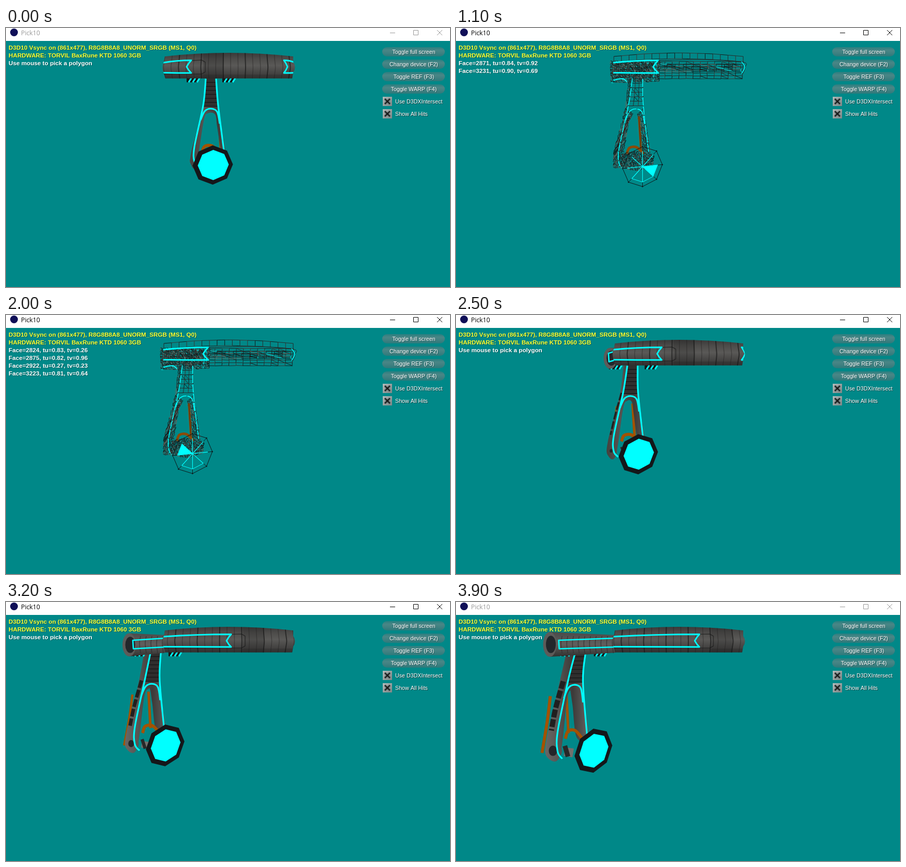
An HTML page with a canvas for the animation above (4 s loop, 858 px wide and 501 px high).

```html
<!DOCTYPE html>
<html lang="en">
<head>
<meta charset="utf-8">
<title>Pick10</title>
<style>
html, body { margin: 0; width: 100%; height: 100%; overflow: hidden; background: #008888; }
canvas { display: block; }
</style>
</head>
<body>
<canvas id="stage" width="858" height="501"></canvas>
<script>
const c = document.getElementById('stage').getContext('2d');
const CYAN = '#00ffff', BROWN = '#a35200', LOOP = 4000, STEP = 100;
const PICK_ON = 600, PICK_MOVE = 1100, PICK_OFF = 2400;
const SANS = '"Liberation Sans", Arial, sans-serif';

let k = 0, e = 0, seed = 1;   // turn of the model, its eased drop, random state
const rnd = () => (seed = seed * 16807 % 2147483647) / 2147483647;
const mix = (a, b, f) => a + (b - a) * f;
const mid = (p, q, f) => [mix(p[0], q[0], f), mix(p[1], q[1], f)];

// turning slides a point left, more so lower down and deeper in; low points also drop
function place(depth, x, y) {
  const low = (y - 98) / 165;
  return [x - k * (155 + 12 * Math.min(1, low * 2.4) + 15 * depth), y + e * 33 * low * Math.abs(low)];
}
const edge = (depth, ...pts) => pts.map(p => place(depth, ...p));

function trace(pts, smooth, closed) {
  c.beginPath();
  c.moveTo(...pts[0]);
  for (let i = 1; i < pts.length; i++) {
    const p = pts[i - 1], q = pts[i];
    if (!smooth) { c.lineTo(...q); continue; }
    const o = pts[i - 2] || p, r = pts[i + 1] || q;
    c.bezierCurveTo(p[0] + (q[0] - o[0]) / 6, p[1] + (q[1] - o[1]) / 6,
      q[0] - (r[0] - p[0]) / 6, q[1] - (r[1] - p[1]) / 6, ...q);
  }
  if (closed) c.closePath();
}
function line(pts, color, width, smooth = true, closed = false) {
  trace(pts, smooth, closed);
  c.strokeStyle = color;
  c.lineWidth = width;
  c.stroke();
}
function area(pts, color, smooth = false) {
  trace(pts, smooth, true);
  c.fillStyle = color;
  c.fill();
}
function oval(x, y, rx, ry, color) {
  c.beginPath();
  c.ellipse(x, y, rx, ry, 0, 0, 7);
  c.fillStyle = color;
  c.fill();
}
function shade(x0, y0, x1, y1, ...colors) {
  const g = c.createLinearGradient(x0, y0, x1, y1);
  colors.forEach((v, i) => g.addColorStop(i / (colors.length - 1), v));
  return g;
}
function text(s, x, y, font, color, shadow) {
  c.font = font;
  if (shadow) {
    c.fillStyle = shadow;
    c.fillText(s, x + 1, y + 1);
  }
  c.fillStyle = color;
  c.fillText(s, x, y);
}

function armParts() {
  return {
    outer: edge(1, [384, 98], [380, 155], [358, 240], [358, 265]),
    inner: edge(0, [368, 265], [382, 180], [390, 165]),
    rearIn: edge(1, [404, 167], [408, 190], [416, 238]),
    rearOut: edge(0, [424, 238], [410, 155], [408, 98]),
    trims: [
      edge(0, [386, 98], [381, 150], [364, 230], [364, 258], [373, 268]),
      edge(0, [406, 98], [410, 150], [421, 236]),
      edge(0, [376, 178], [384, 161], [396, 156], [408, 162], [413, 185])
    ],
    cable: edge(2, [380, 175], [374, 215], [364, 260]),
    rod: edge(2, [411, 170], [415, 232]),
    hose: edge(0, [379, 240], [384, 229], [398, 228], [412, 240])
  };
}

function arm() {
  const a = armParts();
  line(a.cable, BROWN, 1 + 5 * k);
  line(a.rod, BROWN, 5);
  oval(...place(.3, 362, 257), 7 + 8 * k, 8 + 7 * k, '#555351');
  const left = mix(357, 174, k), side = k > .4 ? '#686664' : '#45423f';
  area([...a.outer, ...a.inner, ...a.rearIn, ...a.rearOut],
    shade(left, 0, left + 78, 0, side, '#555351', '#3c3a39', '#5f5d5b'), true);

  const neck = edge(0, [386, 97], [405, 97], [409, 152], [382, 152]);
  area(neck, '#302f2e');
  for (let f = .15; f < 1; f += .14)
    line([mid(neck[0], neck[3], f), mid(neck[1], neck[2], f)], '#191919', 1.5);

  if (k > .25) {
    c.setLineDash([15, 4]);
    line(edge(.6, [381, 150], [369, 195], [361, 228]), '#201f1f', 10 * k);
    c.setLineDash([]);
    oval(...place(.4, 361, 257), 8 * k, 10 * k, '#24262a');
  }
  a.trims.forEach(p => line(p, CYAN, 3.2));
  line(edge(0, [377, 258], [394, 260]), '#72706d', 4 + 13 * k);
  line(edge(0, [378, 250], [384, 265]), '#282828', 9 * k + .1);
  line(a.hose, BROWN, 6);
}

function lensShape() {
  const hub = [399.5 - 133.5 * k, 265 + 22.5 * e];
  const rim = Array.from({ length: 8 }, (_, i) => {
    const a = (i - 2) * Math.PI / 4, x = (39 - 2.5 * k) * Math.cos(a);
    return [hub[0] + x, hub[1] + (38 + 4.5 * e) * Math.sin(a) - (.03 + .25 * k) * x];
  });
  return { hub, rim, glass: f => rim.map(p => mid(hub, p, f)) };
}

function lens() {
  const { rim, glass } = lensShape();
  area(rim, '#14171a');
  area(glass(.77).map(([x, y]) => [x + 1, y]), CYAN);
}

function stubs() {
  for (const x0 of [349, 418]) {
    const x = x0 - 151 * k;
    area([[x, 97], [x + 26, 97], [x + 20, 105], [x, 105]], '#161616');
    for (let d = 6; d < 24; d += 8)
      line([[x + d + 3, 97], [x + d - 2, 105]], CYAN, 3.2, false);
  }
}

function tube() {
  const x = 350 - 180 * k;
  if (x > 303) return;
  const ry = 18.5 + 5.5 * k, cx = x + 12, cy = 84 - 2 * e;
  area([[cx, cy - ry], [308, 64], [308, 98], [cx, cy + ry]], shade(0, 60, 0, 104, '#4c4b4a', '#605f5d', '#353433'));
  for (let r = 304; r > cx + 18; r -= 11)
    line([[r, 66], [r - 2, 80], [r, 99]], '#2c2b2b', 1);
  oval(cx, cy, 13, ry, '#5d5b59');
  oval(cx + 2, cy, 9.5, ry * .7, '#22272b');
  const left = 347 - 148 * k;
  if (left < 304)
    line([[308, 70], [left, 74], [left + 1, 90.5], [308, 87]], CYAN, 2.6, false);
}

function ringPath() {
  c.beginPath();
  c.moveTo(307, 55);
  c.quadraticCurveTo(430, 41, 555, 55);
  c.lineTo(555, 66);
  c.quadraticCurveTo(562, 76, 555, 86);
  c.lineTo(553, 97.5);
  c.lineTo(308, 97.5);
  c.lineTo(305, 88);
  c.quadraticCurveTo(300, 76, 305, 65);
  c.closePath();
}

// cyan frame on the ring, open towards the far side
function chevron(x, notch, far) {
  c.beginPath();
  c.moveTo(far, 67);
  c.quadraticCurveTo(mix(far, x, .5), 62.5, x, 62.5);
  c.quadraticCurveTo(x - notch * .6, 68, x - notch, 75);
  c.quadraticCurveTo(x - notch * .6, 82, x, 87);
  c.quadraticCurveTo(mix(far, x, .5), 87, far, 86.5);
  c.strokeStyle = CYAN;
  c.lineWidth = 2.8;
  c.stroke();
}

function ring() {
  c.save();
  ringPath();
  c.fillStyle = shade(0, 47, 0, 98, '#393837', '#4d4c4a', '#5a5957', '#474645', '#363534');
  c.fill();
  c.clip();
  const joint = 378 + 112 * k;
  for (let i = -20; i < 22; i++) {
    const x = joint + i * 14, bend = (x - 430) * .015;
    line([[x, 45], [x + bend, 62], [x + bend * 2, 76], [x + bend, 88], [x, 99]],
      i % 3 ? 'rgba(30,29,28,.4)' : 'rgba(20,20,20,.65)', i % 3 ? 1.4 : 2);
  }
  c.fillStyle = 'rgba(25,25,25,.2)';
  c.fillRect(joint + 3, 45, 40, 55);
  c.fillRect(302, 90, 258, 8);
  line([[303, 66], [joint, 62], [joint + 7, 66], [joint + 7, 85], [joint, 89], [303, 89]], 'rgba(20,20,20,.55)', 1.5, false);
  chevron(358 + 112 * k, 9, 304);
  if (k < .55) chevron(537 + 42 * k, -7, 559);
  c.restore();
}

function along(pts, f) {
  const s = Math.min(f, .9999) * (pts.length - 1), i = Math.floor(s);
  return mid(pts[i], pts[i + 1], s - i);
}

// a net of thin segments between two curves; mess adds diagonals and jitter
function net(a, b, rows, cols, colors, mess = 0) {
  const node = (i, j) => mid(along(a, i / rows), along(b, i / rows), j / cols)
    .map(v => v + (rnd() - .5) * 3 * mess);
  const ink = () => colors[Math.floor(rnd() * colors.length)];
  for (let i = 0; i <= rows; i++) for (let j = 0; j <= cols; j++) {
    const p = node(i, j);
    if (i < rows) line([p, node(i + 1, j)], ink(), 1);
    if (j < cols) line([p, node(i, j + 1)], ink(), 1);
    if (i < rows && j < cols && rnd() < mess) line([p, node(i + 1, j + 1)], ink(), 1);
  }
}

function wire(sector) {
  seed = 77;
  const dark = ['#151515', '#2b2928', '#3a3633', '#262626'];
  const busy = [...dark, '#111', '#1a1a1a', '#6d645c', '#5c544c'];
  const lit = [...busy, ...busy, CYAN];
  const a = armParts(), back = pts => [...pts].reverse();
  const arc = y => [-1, -.5, 0, .5, 1].map(d => [430 + 125 * d, y + 7 * d * d]);

  net(arc(48), arc(59), 17, 1, dark);
  net([[390, 65], [555, 65]], [[390, 98], [553, 98]], 12, 6, dark, .3);
  net([[392, 70], [550, 70]], [[392, 84], [550, 84]], 10, 3, lit, .4);
  net([[298, 64], [394, 64]], [[300, 105], [392, 103]], 24, 10, lit, .7);
  net([[302, 68], [380, 67]], [[302, 96], [380, 96]], 19, 7, busy, .9);
  chevron(391, 10, 304);
  line([[391, 63], [480, 61], [554, 66], [559, 76], [554, 89]], '#242424', 1);
  line([[552, 65], [558, 76], [552, 88]], CYAN, 1.5);
  line([[304, 101], [322, 98], [330, 104]], CYAN, 2);

  net(a.trims[0].slice(0, 2), a.trims[1].slice(0, 2), 6, 3, dark, .3);
  net(a.outer.slice(0, 2), a.trims[0].slice(0, 2), 8, 2, busy, .6);
  net(a.outer.slice(1), back(a.inner), 24, 5, busy, .9);
  net(a.rearIn, back(a.rearOut).slice(1), 18, 3, busy, .7);
  c.setLineDash([16, 2]);
  a.trims.forEach(p => line(p, CYAN, 1.6));
  c.setLineDash([]);
  line(a.rod, '#8b4a08', 4);
  line(a.hose, '#8b4a08', 5);
  line(a.rod, '#3b2a1a', 1);
  net([[322, 243], [350, 238], [382, 246]], [[318, 270], [350, 276], [380, 267]], 20, 8, busy, .9);

  const { hub, rim, glass } = lensShape(), pane = glass(.77);
  line(rim, '#101618', 1, false, true);
  rim.forEach((p, i) => {
    line([pane[i], p], '#101618', 1);
    line([hub, pane[i]], CYAN, 1.2);
    oval(...p, 1.2, 1.2, '#101618');
  });
  line(pane.slice(3, 6), CYAN, 1, false);
  area([hub, pane[(sector + 10) % 8], pane[(sector + 11) % 8]], CYAN);
}

function titleBar(active) {
  const ink = active ? '#000' : '#999';
  c.fillStyle = '#fff';
  c.fillRect(0, 0, 858, 25);
  oval(15.5, 8.5, 7.5, 7.5, '#101058');
  text('Pick10', 29, 14, '12.3px "Open Sans", "Noto Sans", sans-serif', ink);
  c.strokeStyle = ink;
  c.lineWidth = 1;
  c.strokeRect(787.5, 4.5, 9, 9);
  line([[742, 9.5], [752, 9.5]], ink, 1, false);
  line([[833, 4], [843, 14]], ink, 1, false);
  line([[843, 4], [833, 14]], ink, 1, false);
}

function panel() {
  const font = '10.7px ' + SANS;
  c.textAlign = 'center';
  ['Toggle full screen', 'Change device (F2)', 'Toggle REF (F3)', 'Toggle WARP (F4)'].forEach((s, i) => {
    const y = 46 + i * 24;
    c.beginPath();
    c.roundRect(727, y - 9, 121, 18, 9);
    c.fillStyle = shade(0, y - 9, 0, y + 9, '#2a7f80', '#4a8686', '#3f8081', '#2c7a7b');
    c.fill();
    text(s, 788, y + 4, font, '#fff', '#285858');
  });
  c.textAlign = 'left';
  ['Use D3DXIntersect', 'Show All Hits'].forEach((s, i) => {
    const y = 133 + i * 24;
    c.fillStyle = shade(728, y, 746, y + 18, '#b5bcbc', '#98a0a0', '#7c8686');
    c.fillRect(728, y, 18, 18);
    for (const [width, ink] of [[5, 'rgba(40,45,45,.35)'], [2, '#181a1a']]) {
      line([[732, y + 4], [742, y + 14]], ink, width, false);
      line([[742, y + 4], [732, y + 14]], ink, width, false);
    }
    text(s, 752, y + 13, font, '#fff', '#123c3c');
  });
}

function hud(lines) {
  lines.forEach((s, i) => text(s, 5, 42 + i * 15, 'bold 11.7px ' + SANS,
    i < 2 ? '#ffff30' : '#fff', 'rgba(0,60,60,.55)'));
}

// hits under the pointer as it circles the lens
function hits(t, sector) {
  const f = (t - PICK_MOVE) / 900;
  const hit = (face, u, v) => `Face=${face}, tu=${u.toFixed(2)}, tv=${v.toFixed(2)}`;
  const list = [
    hit(2871 + sector, .84 - .02 * f, .92 + .04 * f),
    hit(3231 - 2 * sector, .9 - .09 * f, .69 - .05 * f)
  ];
  if (sector > 2) {
    list.unshift(hit(2824, .73 + .1 * f, .36 - .1 * f));
    list.splice(2, 0, hit(2922, .37 - .1 * f, .13 + .1 * f));
  }
  return list;
}

function draw(t) {
  const u = (t < PICK_ON ? t : Math.max(575, t - PICK_OFF + PICK_ON)) / 1000;
  k = .52 * u - .02 * u * u;
  e = k ** 1.6;
  c.fillStyle = '#008888';
  c.fillRect(0, 0, 858, 501);
  c.lineJoin = 'round';
  const picking = t >= PICK_ON && t < PICK_OFF;
  const sector = t < PICK_MOVE ? -2 : Math.min(4, Math.floor((t - PICK_MOVE) / 200));
  if (picking) {
    wire(sector);
  } else {
    arm();
    lens();
    stubs();
    tube();
    ring();
  }
  titleBar(t >= PICK_ON && t < 3900);
  panel();
  hud([
    'D3D10 Vsync on (861x477), R8G8B8A8_UNORM_SRGB (MS1, Q0)',
    'HARDWARE: TORVIL BaxRune KTD 1060 3GB',
    ...(picking ? hits(t, sector) : ['Use mouse to pick a polygon'])
  ]);
}

let last = -1;
const begin = performance.now();
function tick() {
  const t = Math.floor((performance.now() - begin) % LOOP / STEP) * STEP;
  if (t !== last) draw(last = t);
  requestAnimationFrame(tick);
}
tick();
</script>
</body>
</html>
```
